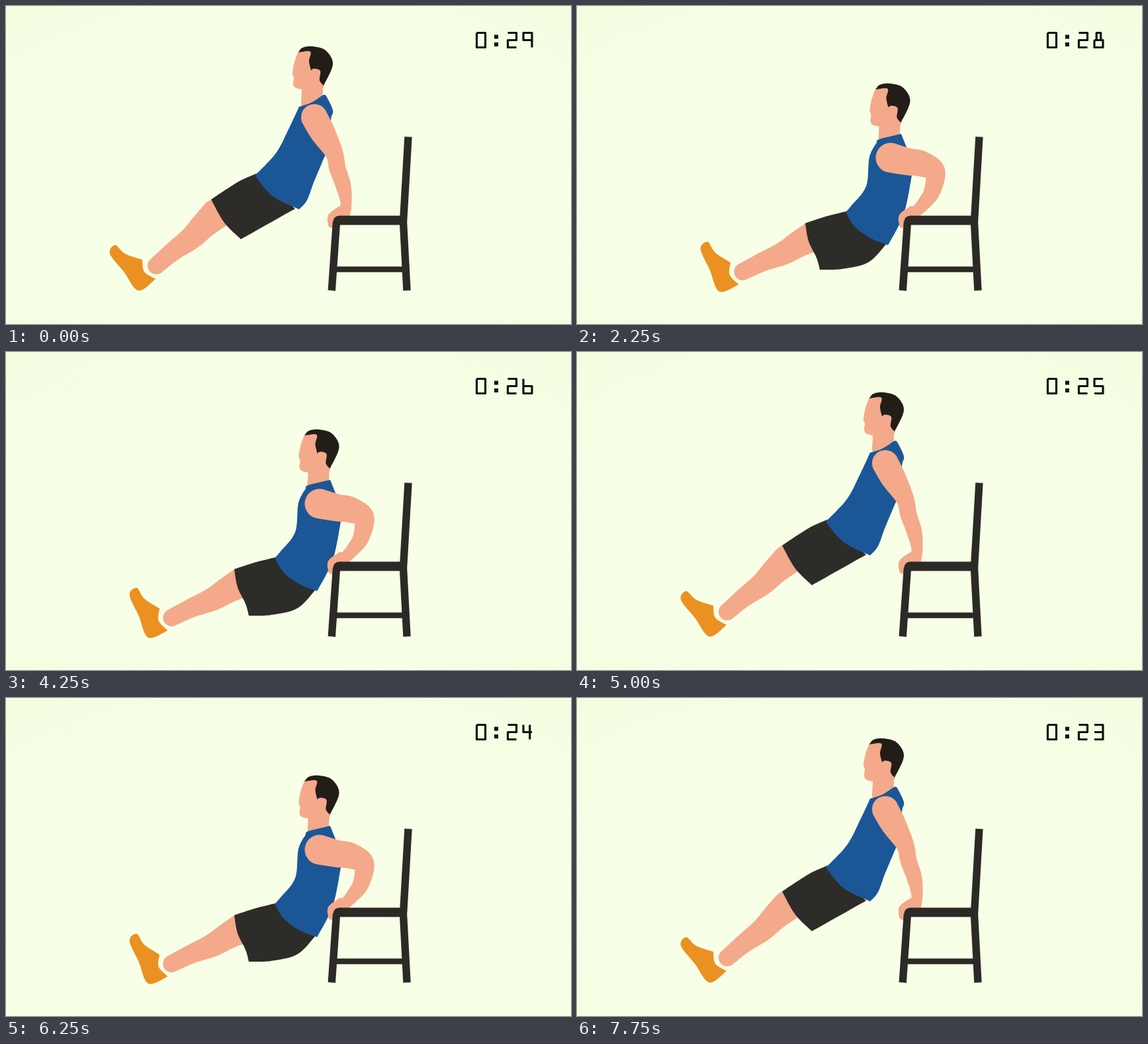
An HTML page for the animation above (8 s loop, 854 by 480 pixels).

```html
<!DOCTYPE html>
<html lang="en">
<head>
<meta charset="utf-8">
<title>Chair dips</title>
<style>
  html, body { margin: 0; width: 100%; height: 100%; overflow: hidden; background: #f7ffe6; }
  svg { display: block; width: 100vw; height: 100vh; }
</style>
</head>
<body>
<svg viewBox="0 0 854 480" role="img" aria-label="Chair dips with a countdown">
  <defs>
    <radialGradient id="glow" cx="50%" cy="58%" r="72%">
      <stop offset=".55" stop-color="#f7ffe7"/>
      <stop offset="1" stop-color="#f3fee1"/>
    </radialGradient>
  </defs>
  <rect width="854" height="480" fill="url(#glow)"/>
  <g id="up"></g>
  <g id="down"></g>
  <g id="chair" fill="none" stroke="#2b2a26" stroke-width="11.4">
    <path d="M608 197.500L600.300 330M499.500 326L492.300 429.500M600.500 326L606 429.500"/>
    <path d="M499 397.500H602" stroke-width="8.500"/>
    <path d="M494 330.500V327Q495 316.500 504 316.500H605.500V330.500Z" fill="#2b2a26" stroke="none"/>
  </g>
  <g fill="none" stroke="#10120e" stroke-width="3.200" stroke-linejoin="round">
    <path id="minutes" transform="translate(710 39)"/>
    <path d="M741 43.500v6m0 5.500v6" stroke-width="6"/>
    <path id="tens" transform="translate(757 39)"/>
    <path id="ones" transform="translate(780.500 39)"/>
  </g>
</svg>
<script>
const STEP = 1250, LOOP = 8000, START = 29;
const SKIN = '#f4a98a', BLUE = '#1b5797', DARK = '#2e2c28',
      SHOE = '#ea9121', SOCK = '#f9f1e7', HAIR = '#231d18';
const byId = id => document.getElementById(id);
const parse = text => text.trim().split(/\s+/).map(p => p.split(',').map(Number));

// Catmull-Rom samples through key points of any dimension.
function spline(pts, n = 14) {
  const out = [];
  for (let i = 0; i < pts.length - 1; i++) {
    const [a, b, c, d] = [pts[i - 1] || pts[i], pts[i], pts[i + 1], pts[i + 2] || pts[i + 1]];
    for (let k = 0; k <= n; k++) {
      const t = k / n;
      out.push(b.map((v, j) => v + t / 2 * (c[j] - a[j] +
        t * (2 * a[j] - 5 * v + 4 * c[j] - d[j] + t * (3 * (v - c[j]) + d[j] - a[j])))));
    }
  }
  return out;
}

const draw = (fill, d) => `<path fill="${fill}" d="${d}"/>`;

// Closed outline; "|" marks a corner at the point before it.
function outline(fill, text) {
  let pts = [];
  for (const run of text.split('|').map(parse)) {
    pts = pts.concat(spline([...pts.slice(-1), ...run]));
  }
  return draw(fill, 'M' + pts.map(p => p.map(v => v.toFixed(1))).join('L') + 'Z');
}

// Tapered limb: a round brush swept along joints given as x,y,radius.
const limb = text => draw(SKIN, spline(parse(text)).map(([x, y, r]) =>
  `M${x - r} ${y}a${r} ${r} 0 1 1 ${2 * r} 0a${r} ${r} 0 1 1 ${-2 * r} 0`).join(''));

const head =
  limb('463,128,16 462,146,16') +
  outline(SKIN, '442,68 436,84 | 433,101 435,108 434,117 437,123 447,126 | 479,125 480,70') +
  outline(HAIR, '442,70 448,63 463,61 483,67 494,88 480,120 | 474,112 475,98 466,94.5 461,97 | 458,83 460,69 442,70');

const lowerLeg =
  limb('227,392,13 253,370,14.5 280,350,17.5 300,330,20 318,314,23') +
  outline(SOCK, '218,381 | 236,402 | 225,414 | 200,402 | 204,383') +
  outline(SHOE, '206,383 180,374 165,361 157,374 178,401 200,429.5 226,412 | 209,401 206,383');

const fist = limb('506,309,7 492,318,5.5 492,330,5');

const poses = {
  up: {
    head: '', leg: '',
    body: outline(DARK, '378,253 350,266 310,292 | 330,327 355,352 | 437,306') +
      outline(BLUE, '443,152 461,146 479,134.5 | 484,136 494,157 492,166 | 483,224 | 466,264 455,293 443,307 | 403,287 376,256 | 408,222 428,184 443,152'),
    arm: limb('466,168,20 478,190,19 496,222,13.5 501,245,12.5 510,272,11.5 514,300,8.5 509,320,10')
  },
  down: {
    head: 'translate(9.5 56)', leg: 'translate(15 1.5) rotate(14 200 429.5)',
    body: outline(DARK, '407,310 375,318 345,328 | 350,355 362,380 367,398 | 400,397 440,387 467,360') +
      outline(BLUE, '453,206 457,201 490,193 | 498,213 | 506,256 | 497,303 486,332 470,361 | 443,350 420,333 406,311 | 415,301 437,272 442,228 453,206'),
    arm: limb('474,229,22.5 500,235,20.5 520,238,19.5 541,250,15.5 537,279,12.5 526,296,10.5 512,311,8.5 503,318,8')
  }
};

for (const [name, p] of Object.entries(poses)) {
  byId(name).innerHTML =
    `<g transform="${p.head}">${head}</g><g transform="${p.leg}">${lowerLeg}</g>` +
    p.body + p.arm + fist;
}

// Digits are strokes over a grid of 5 columns and 3 rows, lettered a to o.
const DIGITS = ['aeoka', 'cm', 'aejfko', 'aeok fj', 'afj dn', 'eafjok', 'akojf', 'aehm', 'fjokf gbdi', 'oeafj'];
const node = ch => {
  const i = ch.charCodeAt(0) - 97;
  return [1.5 + 3.25 * (i % 5), 1.5 + 11 * Math.floor(i / 5)];
};
const setDigit = (id, n) => byId(id).setAttribute('d',
  DIGITS[n].split(' ').map(s => 'M' + [...s].map(node).join('L')).join(''));

function render(time) {
  const step = Math.floor((time % LOOP) / STEP);
  const left = START - step;
  byId('up').style.display = step % 2 ? 'none' : '';
  byId('down').style.display = step % 2 ? '' : 'none';
  setDigit('minutes', Math.floor(left / 60));
  setDigit('tens', Math.floor(left / 10));
  setDigit('ones', left % 10);
}

const begin = performance.now();
function tick() {
  render(performance.now() - begin);
  requestAnimationFrame(tick);
}
tick();
</script>
</body>
</html>
```
